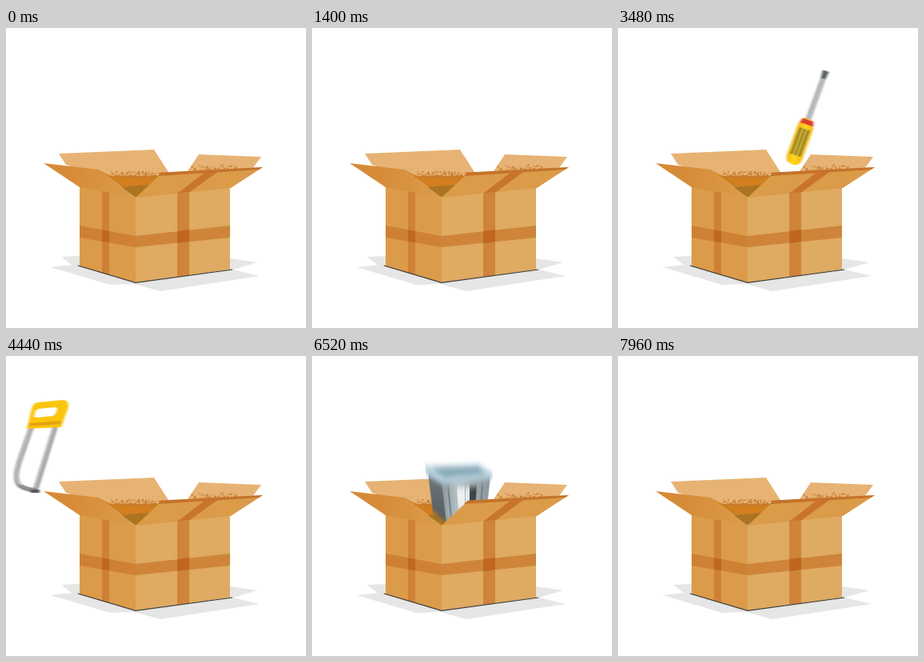
An HTML page that plays this animation: 375x375 px, repeating every 8 s.

```html
<!DOCTYPE html>
<html lang="en">
<head>
<meta charset="utf-8">
<title>Packing tools</title>
<style>
html, body { margin: 0; width: 100%; height: 100%; overflow: hidden; background: #fff; }
svg { display: block; width: 100vw; height: 100vh; }
</style>
</head>
<body>
<svg viewBox="0 0 375 375" xmlns="http://www.w3.org/2000/svg">
  <defs>
    <linearGradient id="flap"><stop offset=".3" stop-color="#d68b37"/><stop offset="1" stop-color="#dc9c4a"/></linearGradient>
    <linearGradient id="yellow"><stop offset="0" stop-color="#f2b70d"/><stop offset=".5" stop-color="#ffd91c"/><stop offset="1" stop-color="#f4b90b"/></linearGradient>
    <linearGradient id="steel"><stop offset="0" stop-color="#777d80"/><stop offset=".5" stop-color="#d2d6d8"/><stop offset="1" stop-color="#83898c"/></linearGradient>
    <linearGradient id="bin"><stop offset="0" stop-color="#8b979b"/><stop offset=".3" stop-color="#b4bec1"/><stop offset="1" stop-color="#89969b"/></linearGradient>
    <linearGradient id="side" x2="0" y2="1"><stop offset="0" stop-color="#6f777a"/><stop offset="1" stop-color="#555b5e"/></linearGradient>
    <filter id="blur" filterUnits="userSpaceOnUse" x="-10" y="-10" width="395" height="395" color-interpolation-filters="sRGB">
      <feGaussianBlur id="smear" stdDeviation="0 0"/>
    </filter>
    <clipPath id="above"><path d="M0 0H375V212H0Z"/></clipPath>
  </defs>

  <path fill="#e6e6e6" d="M69 286L92 285L280 288L314 293L284 302L317 310L193 329L160 320L130 321L56 299L82 296Z"/>

  <!-- back of the box -->
  <path fill="#e6b374" d="M66 157L185 152L205 183L120 186L75 171Z"/>
  <path fill="#e6b374" d="M241 158L319 161L308 176L225 182Z"/>
  <path fill="#d17e1f" d="M116 177L130 185L197 184L162 212Z"/>
  <path fill="#ab7421" d="M144 199L180 196L162 212Z"/>
  <g id="grain" fill="#c67b2c"></g>

  <g clip-path="url(#above)"><g id="motion">
    <g class="item">
      <g transform="translate(184 118) rotate(42)">
        <rect x="-6" y="-60" width="12" height="145" rx="5" fill="#c98032"/>
        <rect x="-8" y="15" width="16" height="72" rx="7" fill="url(#yellow)"/>
        <path d="M-8 32H8M-8 44H8M-8 56H8M-8 68H8" stroke="#3b3e40" stroke-width="3"/>
        <path fill="#4c5255" d="M-34 -60Q-24 -82 -6 -84H14V-86H32V-58H14V-63H-8Q-20 -66 -34 -60Z"/>
        <path fill="#949b9e" d="M-27 -69Q-18 -78 -4 -80H32V-76H0Q-14 -76 -27 -69Z"/>
      </g>
    </g>
    <g class="item">
      <g transform="translate(-3 2)">
        <path d="M144 50L176 88" stroke="#74787b" stroke-width="5"/>
        <path d="M144 50L176 88" stroke="#d0d2d3" stroke-width="4" stroke-dasharray="2 3"/>
        <path fill="#44494c" d="M171 89L180 83L187 92L200 101L186 114L178 101Z"/>
        <path d="M176 97L187 91M183 106L195 98" stroke="#84898b" stroke-width="2"/>
        <path fill="#8097a0" d="M178 143L162 164Q157 174 165 178Q173 180 178 173L192 150Z"/>
        <path fill="#a9bcc2" d="M180 147L165 167L170 169L187 149Z"/>
        <circle cx="168" cy="170" r="5" fill="#454d52"/>
        <path fill="#f0bd10" d="M184 115L187 125L176 145L189 154L202 139L214 145L225 138V126L201 101Z"/>
        <path fill="#ffdc25" d="M186 114L201 102L221 125L207 139L191 132L181 146L178 144L188 126Z"/>
        <path fill="#ee7130" d="M205 142L223 125Q228 132 224 139Q218 146 208 146Z"/>
        <path fill="#dc382d" d="M204 117L210 112L218 122L212 126Z"/>
        <path d="M200 127L207 136M203 125L210 134M197 130L203 137" stroke="#705d22" stroke-width="1.5"/>
        <path d="M193 116L197 123M198 119L192 122" stroke="#e17c22" stroke-width="2"/>
        <path d="M180 139L191 147" stroke="#f8eaa0" stroke-width="3"/>
      </g>
    </g>
    <g class="item">
      <g transform="translate(184 112) rotate(20)">
        <rect x="-3" y="-62" width="6" height="68" fill="url(#steel)"/>
        <path fill="#5c6265" d="M-4 -62H4L3 -52H-3Z"/>
        <path fill="url(#yellow)" d="M-6 2H6L10 12V52Q10 62 0 62Q-10 62 -10 52V12Z"/>
        <path d="M-5 15V50M0 15V50M5 15V50" stroke="#45494b" stroke-width="2"/>
        <path fill="#da3c2d" d="M-7 3H7L9 9H-9Z"/>
      </g>
    </g>
    <g class="item">
      <g transform="translate(155 0)" fill="none">
        <path d="M31 88L15 134Q8 157 18 163Q25 167 36 168" stroke="#8c8f91" stroke-width="6"/>
        <path d="M30 90L14 136Q9 156 18 161" stroke="#d6d8d9" stroke-width="2"/>
        <path d="M61 87L36 167" stroke="#8e9193" stroke-width="6"/>
        <path d="M60 88L36 165" stroke="#c9cbcc" stroke-width="2"/>
        <path d="M30 169L41 169" stroke="#55595b" stroke-width="4"/>
        <path fill="#fac50c" fill-rule="evenodd" d="M38 58L70 55Q78 55 77 64L68 89L25 91L31 66Q33 59 38 58ZM40 66Q36 67 35 72Q33 77 37 77L57 75Q61 74 63 67Q63 64 60 64Z"/>
        <path d="M28 86L68 83" stroke="#d99310" stroke-width="4" stroke-dasharray="2 1"/>
      </g>
    </g>
    <g class="item">
      <g transform="translate(0 -67)">
        <path fill="url(#side)" d="M145 146L163 157L169 208L151 194Z"/>
        <path fill="url(#bin)" d="M162 157L223 151L217 203L168 208Z"/>
        <path fill="#eef1f2" d="M181 164L191 163L191 189L183 191Z"/>
        <path fill="#3d4447" d="M197 164L206 163L204 188L197 189Z"/>
        <path fill="#e5e9ea" d="M192 164L197 163L197 188L192 189Z"/>
        <path d="M170 163L174 201M213 160L210 197" stroke="#718086" stroke-width="2"/>
        <path fill="#b5d0db" d="M141 137L209 135L226 146L225 153L161 159L143 148Z"/>
        <path fill="#8fafbd" d="M150 140L206 138L217 146L166 151Z"/>
        <path d="M154 142L207 140M158 145L211 143M162 148L214 146" stroke="#6c8d9b" stroke-dasharray="2 1"/>
      </g>
    </g>
    <g class="item" id="nails" fill="none" stroke-linecap="round"></g>
  </g></g>

  <!-- front of the box -->
  <path fill="#db9b4a" d="M92 197L162 211V318L92 298Z"/>
  <path fill="#dfaa62" d="M162 211L280 197V302L162 318Z"/>
  <path fill="#ce8135" d="M92 247L162 260V274L92 262ZM120 202L129 204V308L120 306Z"/>
  <path fill="#ce8539" d="M162 260L280 247V262L162 274ZM214 204L229 202V309L214 311Z"/>
  <path fill="#c0661f" d="M120 252L129 254V268L120 267ZM214 254L229 252V267L214 269Z"/>
  <path fill="none" stroke="#3d3a36" stroke-width="1.2" d="M90 297L162 318.300L283 302"/>
  <path fill="url(#flap)" d="M47 169L116 177L162 212L92 199Z"/>
  <path fill="#db9b49" d="M195 181L321 174L281 200L162 212Z"/>
  <path fill="#c8752b" d="M249 180L267 178L230 205L214 207Z"/>
  <path fill="#c5722a" d="M195 180.500L321 174L316 177L190 185Z"/>
</svg>
<script>
const LOOP = 8000, FRAME = 40, SLIDE = 840;

// side: -1 enters from the left, 1 from the right; edge is the leading rest edge
const moves = [
  { start: 200, side: 1, edge: 120, top: 38, fall: 360, turn: -6 },
  { start: 1600, side: -1, edge: 223, top: 50, fall: 320, turn: -5, sway: 3, lift: 4.5 },
  { start: 2920, side: 1, edge: 156, top: 51, fall: 240, turn: 0 },
  { start: 4200, side: -1, edge: 233, top: 54, fall: 280, turn: 4 },
  { start: 5520, side: 1, edge: 141, top: 68, fall: 320, turn: 0 },
  { start: 6840, side: -1, edge: 210, top: 107, fall: 320, turn: 0, hop: 9 }
];
const $ = id => document.getElementById(id);
const items = [...document.querySelectorAll('.item')];

function randomizer(seed) {
  return () => (seed = (seed * 16807) % 2147483647) / 2147483647;
}

function addPath(parent, attrs) {
  const path = document.createElementNS('http://www.w3.org/2000/svg', 'path');
  for (const key in attrs) path.setAttribute(key, attrs[key]);
  parent.append(path);
}

function scatterGrain() {
  const rnd = randomizer(71);
  const strip = (count, x, y, width, height, slope) => {
    let d = '';
    for (let i = 0; i < count; i++) {
      const dx = rnd() * width;
      const py = y + dx * slope + (1 - rnd() ** 2) * height;
      d += `M${(x + dx).toFixed(1)} ${py.toFixed(1)}h1.4v1.3h-1.4z`;
    }
    addPath($('grain'), { d });
  };
  strip(230, 128, 178, 70, 8, 0.01);
  strip(110, 229, 171, 58, 8, -0.02);
}

function scatterNails() {
  const rnd = randomizer(29);
  const shades = ['#6f777a', '#a3aaad', '#8b9396', '#c3c8ca'];
  for (let i = 0; i < 60; i++) {
    const across = rnd() * 2 - 1;
    const x = 165 + across * 37;
    const y = 150 - rnd() * 38 * (1 - across * across);
    const angle = rnd() * Math.PI;
    const dx = Math.cos(angle) * 8, dy = Math.sin(angle) * 5;
    addPath($('nails'), {
      d: `M${x - dx} ${y - dy}L${x + dx} ${y + dy}m${-dy / 2} ${dx / 4}l${dy} ${-dx / 2}`,
      stroke: shades[i % 4], 'stroke-width': 1.8
    });
  }
}

const easeInOut = u => u < 0.5 ? 16 * u ** 5 : 1 - 16 * (1 - u) ** 5;

function pose(move, time) {
  const age = Math.max(0, time - move.start);
  if (age < SLIDE) {
    const left = (1 - age / SLIDE) ** 1.28;
    const far = move.side > 0 ? 379 - move.edge : -move.edge - 4;
    return { x: far * left, y: -(move.hop || 0) * left, angle: 0 };
  }
  const u = Math.min(1, (age - SLIDE) / move.fall);
  const wave = u < 0.5 ? Math.sin(2 * Math.PI * u) : 0;
  const drop = easeInOut(u);
  return {
    x: (move.sway || 0) * wave,
    y: (203 - move.top) * drop - (move.lift || 0) * wave,
    angle: move.turn * drop
  };
}

function draw(time) {
  let blur = [0, 0];
  moves.forEach((move, i) => {
    const shown = time > move.start && time < move.start + SLIDE + move.fall;
    items[i].style.display = shown ? '' : 'none';
    if (!shown) return;
    const now = pose(move, time), before = pose(move, time - 20);
    items[i].setAttribute('transform', `translate(${now.x} ${now.y}) rotate(${now.angle} 184 112)`);
    blur = [now.x - before.x, now.y - before.y].map(v => Math.min(3.5, Math.abs(v) * 0.28));
  });
  const moving = Math.max(...blur) > 0.15;
  $('smear').setAttribute('stdDeviation', blur.join(' '));
  $('motion').setAttribute('filter', moving ? 'url(#blur)' : 'none');
}

scatterGrain();
scatterNails();
const begin = performance.now();
function tick() {
  const time = (performance.now() - begin) % LOOP;
  draw(Math.floor(time / FRAME) * FRAME);
  requestAnimationFrame(tick);
}
tick();
</script>
</body>
</html>
```
